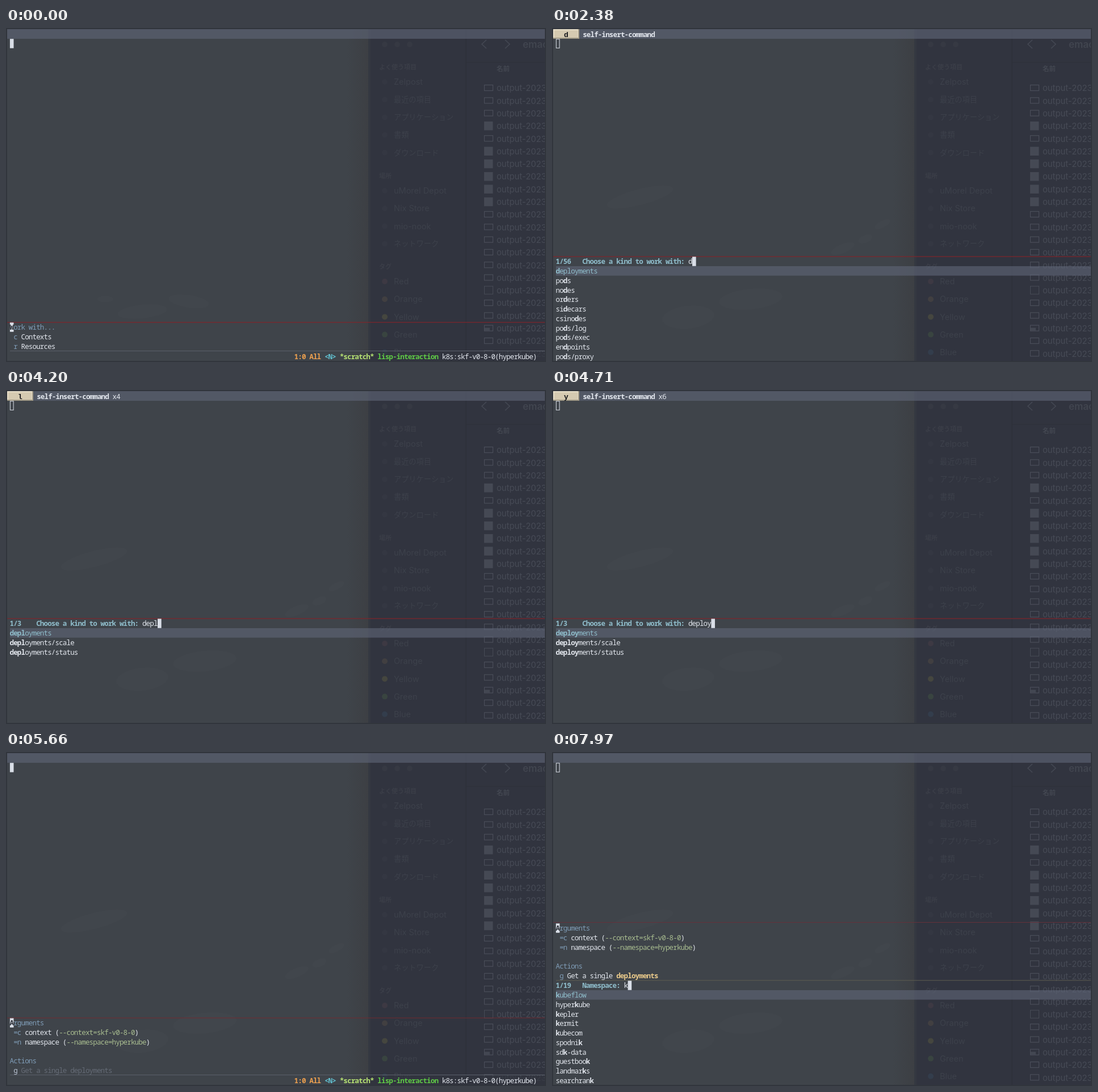
An HTML page with a canvas that plays this animation: 951 px wide and 589 px high, repeating every 8000 ms.

```html
<!DOCTYPE html>
<html>
<head>
<meta charset="utf-8">
<style>
html, body { margin: 0; width: 100%; height: 100%; overflow: hidden; background: #3f444a; }
canvas { display: block; }
</style>
</head>
<body>
<canvas id="stage" width="951" height="589"></canvas>
<script>
const ctx = document.getElementById('stage').getContext('2d');
const LOOP = 8000, LEFT = 6.9, CELL = 6.67, ROW = 16.72;
const WHITE = '#e3e7ee', TEAL = '#8fbdcb', BLUE = '#7f9cb6', GREEN = '#a9bd90',
      YELLOW = '#ebcb8b', DIM = '#656b76', CURSOR = '#d9dee7';
const MONO = '"Noto Sans Mono", "DejaVu Sans Mono", monospace';
const SANS = 'Inter, "Noto Sans CJK JP", "Noto Sans CJK", sans-serif';

function rect(x, y, w, h, color) {
  ctx.fillStyle = color;
  ctx.fillRect(x, y, w, h);
}

function frame(x, y, w, h, color, width = 1) {
  ctx.strokeStyle = color;
  ctx.lineWidth = width;
  ctx.strokeRect(x, y, w, h);
}

function blob(x, y, rx, ry, color, turn = 0) {
  ctx.fillStyle = color;
  ctx.beginPath();
  ctx.ellipse(x, y, rx, ry, turn, 0, 7);
  ctx.fill();
}

function label(str, x, y, size, color, weight = 400) {
  ctx.font = `${weight} ${size}px ${SANS}`;
  ctx.fillStyle = color;
  ctx.fillText(str, x, y + size * 0.36);
}

// Terminal text on a fixed grid; y is the middle of the row. Returns the next x.
function put(str, x, y, color = WHITE, weight = 500) {
  ctx.font = `${weight} 12.5px ${MONO}`;
  ctx.fillStyle = color;
  ctx.textAlign = 'center';
  for (const ch of str) {
    ctx.fillText(ch, x + CELL / 2, y + 4.6);
    x += CELL;
  }
  ctx.textAlign = 'left';
  return x;
}

function line(y, ...runs) {
  let x = LEFT;
  for (const [str, color, weight] of runs) x = put(str, x, y, color, weight);
  return x;
}

function block(x, y) {
  rect(x, y - 8.3, 6.6, 16.4, CURSOR);
}

function rule(y, color, h = 1) {
  rect(2, y, 947, h, color);
}

function wallpaper(first) {
  rect(0, 0, 951, 589, '#3f444a');
  const shade = ctx.createLinearGradient(600, 0, 638, 0);
  shade.addColorStop(0, 'rgba(60,62,66,0)');
  shade.addColorStop(1, 'rgba(60,62,66,.8)');
  rect(600, 0, 38, 589, shade);
  const faint = 'rgba(255,255,255,.012)';
  if (first) {
    blob(175, 478, 14, 6, faint);
    blob(240, 500, 44, 12, faint, -0.1);
    blob(322, 482, 36, 11, faint, 0.15);
  } else {
    blob(155, 298, 60, 14, faint, -0.25);
    blob(582, 346, 15, 6, faint, -0.5);
    blob(552, 372, 13, 7, faint, -0.4);
    blob(512, 389, 22, 8, faint, -0.4);
    blob(240, 510, 46, 20, faint, -0.1);
    blob(350, 478, 56, 18, faint, -0.1);
  }
  rect(638, 2, 313, 587, '#31343f');
  rect(638, 2, 4, 587, 'rgba(63,68,74,.25)');
  rect(809.5, 2, 1.5, 587, '#2d3039');
  rect(811, 60, 140, 1, '#2e313a');
}

function sidebar() {
  const head = '#3b3e48', item = '#3d414b';
  for (const x of [667, 689, 711]) blob(x, 29, 5, 5, '#363943');
  [['よく使う項目', 69], ['場所', 261], ['タグ', 421]].forEach(
    ([str, y]) => label(str, 657, y, 11, head, 700));
  ['Zelpost', '最近の項目', 'アプリケーション', '書類', 'ダウンロード'].forEach(place(95));
  ['uMorel Depot', 'Nix Store', 'mio-nook', 'ネットワーク'].forEach(place(287));
  ['Red', 'Orange', 'Yellow', 'Green', 'Blue'].forEach((str, i) => {
    const y = 447 + i * 31.2;
    blob(667, y, 5, 5, ['#3d3943', '#413f41', '#45463f', '#394440', '#333d4c'][i]);
    label(str, 683, y, 14.5, item);
  });
  function place(top) {
    return (str, i) => {
      const y = top + i * 31.2, wide = str.charCodeAt(0) > 255;
      blob(667, y, 5, 5, '#343742');
      label(str, 683, y, wide ? 13.2 : 14.5, item);
    };
  }
}

function files() {
  ctx.strokeStyle = '#444853';
  ctx.lineWidth = 1.6;
  ctx.beginPath();
  ctx.moveTo(846, 21); ctx.lineTo(838, 28.5); ctx.lineTo(846, 36);
  ctx.moveTo(879, 21); ctx.lineTo(887, 28.5); ctx.lineTo(879, 36);
  ctx.stroke();
  label('emacs', 910, 29, 17, '#41454f', 600);
  label('名前', 864, 72, 11.5, '#434751', 700);
  const solid = [3, 5, 6, 7, 8, 9];
  for (let i = 0; i < 22; i++) {
    const y = 106 + i * 22.3;
    if (solid.includes(i)) rect(842, y - 8, 15.5, 15.5, '#454954');
    else if (i === 16) frame(842.5, y - 7.5, 15, 14, '#474b56');
    else frame(842.5, y - 5.5, 15, 10, '#4a4e59', 1.2);
    if (i === 19) rect(843, y - 1, 9, 5, '#434752');
    label('output-2023', 864, y, 14.8, '#474b56');
  }
}

function header(key, command, count) {
  rect(2, 2, 947, 17, 'rgba(96,102,121,.6)');
  if (!key) return;
  rect(2, 2, 46, 17, '#a49c88');
  rect(2, 2, 44, 15, '#e8dfca');
  rect(4, 4, 41, 13, '#d5cab1');
  ctx.font = '700 13px "Liberation Mono", monospace';
  ctx.fillStyle = '#15161a';
  ctx.textAlign = 'center';
  ctx.fillText(key, 25, 15.5);
  ctx.textAlign = 'left';
  const x = put(command, 54.6, 11, WHITE, 700);
  if (count > 1) put(' x' + count, x, 11);
}

function modeline() {
  rect(638, 571, 311, 17, 'rgba(49,52,63,.6)');
  rect(7, 569, 942, 1, '#5b606a');
  let x = 508;
  for (const [str, color, weight] of [
    ['1:0 All ', '#eda04f', 700], ['<N> ', '#62c2d2', 700], ['*scratch* ', '#b6e273', 700],
    ['lisp-interaction ', '#5fca46', 700], ['k8s:skf-v0-8-0(hyperkube)', WHITE, 500]
  ]) x = put(str, x, 579, color, weight);
}

function chooser(prompt, total, typed, names) {
  rect(7, 420, 942, 16.7, 'rgba(96,102,121,.6)');
  const end = line(411.7, [('1/' + total).padEnd(7) + prompt + ' ', TEAL, 700], [typed]);
  block(end, 411.7);
  names.split(' ').forEach((name, i) => {
    const color = i ? WHITE : TEAL, at = name.indexOf(typed), to = at + typed.length;
    line(428.6 + i * ROW, [name.slice(0, at), color],
      [typed, color, 800], [name.slice(to), color]);
  });
}

function heading(str, y) {
  block(LEFT, y);
  line(y, [str[0], '#2b2f37', 700], [str.slice(1), BLUE]);
}

function resourceMenu(y, dimmed, keyColor) {
  heading('Arguments', y);
  [['=c', 'context', '--context=skf-v0-8-0'], ['=n', 'namespace', '--namespace=hyperkube']]
    .forEach(([key, name, flag], i) => line(y + ROW * (i + 1),
      [` ${key} `, BLUE], [name + ' ('], [flag, GREEN], [')']));
  line(y + ROW * 4, ['Actions', BLUE]);
  line(y + ROW * 5, [' g ', keyColor],
    ['Get a single ', dimmed ? DIM : WHITE],
    ['deployments', dimmed ? DIM : YELLOW, dimmed ? 500 : 700]);
}

function mainMenu() {
  header();
  rule(518.5, '#81242a', 1.2);
  heading('Work with...', 527.7);
  line(544.5, [' c ', BLUE], ['Contexts']);
  line(561.2, [' r ', BLUE], ['Resources']);
  modeline();
}

function kinds(typed, total, names) {
  const n = typed.length;
  header(typed[n - 1] || 'r', n ? 'self-insert-command' : 'kele-resource', n);
  rule(402.5, '#81242a', 1.2);
  chooser('Choose a kind to work with:', total, typed, names);
}

function actions(dimmed) {
  header();
  rule(468.5, '#722a30');
  resourceMenu(477.7, dimmed, '#b9c3d2');
  modeline();
}

function namespaces(typed, total, names) {
  header();
  rule(300, '#64303a');
  resourceMenu(310.7, false, BLUE);
  rect(7, 402.3, 942, 1, '#5f5d51');
  chooser('Namespace:', total, typed, names);
}

const DEPLOY = 'deployments deployments/scale deployments/status';
const scenes = [
  [0, mainMenu],
  [1000, () => kinds('', 188, 'deployments pods namespaces jobs nodes rules roles orders leases events')],
  [2380, () => kinds('d', 56, 'deployments pods nodes orders sidecars csinodes pods/log pods/exec endpoints pods/proxy')],
  [3880, () => kinds('de', 18, 'deployments nodes orders sidecars csinodes nodes/proxy nodes/status sidecars/status workloadentries destinationrules')],
  [4020, () => kinds('dep', 3, DEPLOY)],
  [4200, () => kinds('depl', 3, DEPLOY)],
  [4460, () => kinds('deplo', 3, DEPLOY)],
  [4710, () => kinds('deploy', 3, DEPLOY)],
  [4940, () => actions(false)],
  [5660, () => actions(true)],
  [7380, () => namespaces('', 112, 'kubeflow hyperkube exoset acs air miq nlu daim hype jjin')],
  [7970, () => namespaces('k', 19, 'kubeflow hyperkube kepler kermit kubecom spodnik sdk-data guestbook landmarks searchrank')]
];

function draw(now) {
  const t = now % LOOP;
  const [start, scene] = scenes.findLast(s => s[0] <= t);
  ctx.fontStretch = 'normal';
  wallpaper(start === 0);
  sidebar();
  files();
  ctx.fontStretch = 'condensed';
  const focused = start === 0 || start === 4940 || start === 5660;
  if (focused) block(LEFT, 27.5);
  else frame(7.4, 19.7, 5.8, 15.6, CURSOR);
  scene();
  frame(1, 1, 949, 587, '#31353c', 2);
  requestAnimationFrame(draw);
}
requestAnimationFrame(draw);
</script>
</body>
</html>
```
